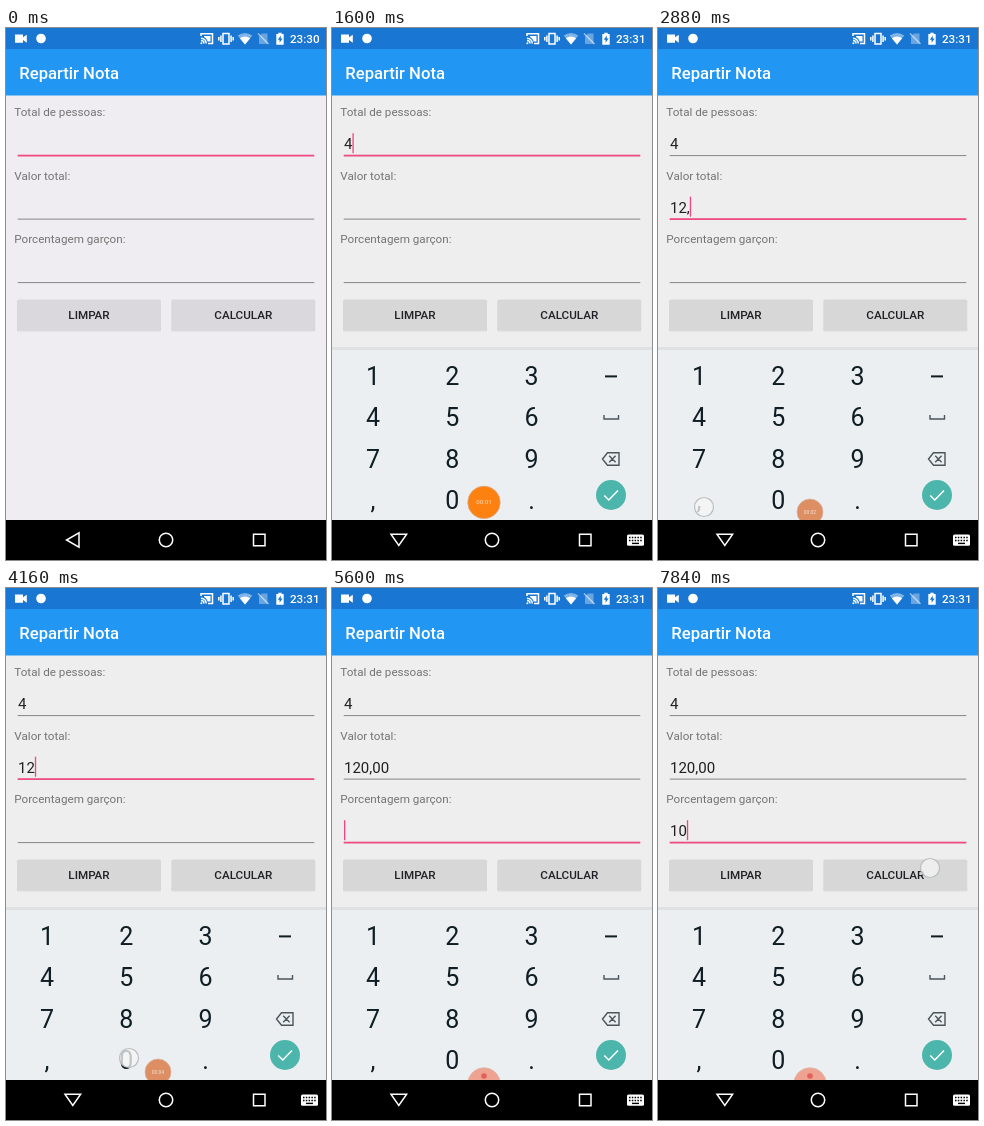
Recreate the animation shown at these times as an HTML page. Size 320 by 532 pixels, loop 8 s.

```html
<!DOCTYPE html>
<html lang="pt">
<head>
<meta charset="utf-8">
<title>Repartir Nota</title>
<style>
  html, body { margin: 0; width: 100%; height: 100%; overflow: hidden; background: #000; }
  svg { display: block; width: 100%; height: 100%; }
  text { font-family: Roboto, Arial, sans-serif; white-space: pre; }
  .label { font-size: 11.67px; fill: #747474; }
  .value { font-size: 15px; fill: #202020; }
  .button { font-size: 11.67px; font-weight: 500; fill: #202124; text-anchor: middle; }
  .key { font-size: 25px; fill: #0f1d24; text-anchor: middle; }
  .line { fill: none; stroke: #fff; stroke-width: 1.5; }
</style>
</head>
<body>
<svg id="stage" viewBox="0 0 320 532">
  <defs>
    <linearGradient id="shade" x2="0" y2="1">
      <stop stop-color="#000" stop-opacity=".22"/>
      <stop offset="1" stop-color="#000" stop-opacity="0"/>
    </linearGradient>
  </defs>
  <rect id="page" width="320" height="532"/>
  <rect width="320" height="21" fill="#1976d2"/>
  <rect y="21" width="320" height="46.5" fill="#2196f3"/>
  <text x="13.3" y="50.5" font-size="16.67" font-weight="500" fill="#fff">Repartir Nota</text>

  <!-- status bar -->
  <g fill="#fff">
    <path d="M9 6.5h8v2.8l3.8-2.6v8l-3.8-2.6v2.7h-8z"/>
    <circle cx="35" cy="10.5" r="4.8"/>
    <path class="line" stroke-width="1.2" d="M195 8V5.8h11.5v9.7H202M195 10.2a5.3 5.3 0 0 1 5.3 5.3M195 12.5a3 3 0 0 1 3 3"/>
    <circle cx="195.4" cy="15.2" r="1"/>
    <path d="M198 8h6.5v5.5h-2.8A7 7 0 0 0 198 9z"/>
    <path class="line" d="M217 5.5h6v10.5h-6zM214.9 7.5v6.5M225.1 7.5v6.5M212.8 9v3.5M227.2 9v3.5"/>
    <path d="M239 16.5L231.7 7.6Q239 2.6 246.3 7.6z" opacity=".45"/>
    <path d="M239 16.5L233.8 10.2Q239 6.6 244.2 10.2z"/>
    <path d="M256 5.5h5.5v10.5h-8.5V8.5z" opacity=".35"/>
    <path class="line" d="M252 5.5l10.5 10.5" stroke-width="1.2" opacity=".55"/>
    <path d="M270.3 6h2v-1.3h3.4V6h2v10.7h-7.4z"/>
    <path d="M274.8 7.5l-3 4.3h1.8v3l3-4.4h-1.8z" fill="#1976d2"/>
    <text id="clock" x="284" y="15.3" font-size="11.67" font-weight="500"></text>
  </g>

  <g id="form"></g>
  <rect id="cursor" width="1.3" height="20" fill="#f0457f"/>

  <g id="keyboard">
    <rect y="320" width="320" height="172" fill="#eceff1"/>
    <rect y="319" width="320" height="3" fill="#dfe1e3"/>
    <g id="keys"></g>
    <rect x="273" y="347.4" width="12" height="2" fill="#0f1d24"/>
    <g fill="none" stroke="#4a565c" stroke-width="1.4">
      <path d="M272 387v4h14.5v-4"/>
      <path d="M275.5 424.7H287v12.6h-11.5l-5-6.3zM277.2 427.8l6.4 6.4M283.6 427.8l-6.4 6.4"/>
    </g>
    <circle cx="279" cy="467" r="15" fill="#4db6ac"/>
    <path class="line" stroke-width="2" d="M272.3 467.5l4.5 4.5 9.2-9.5"/>
  </g>

  <g id="bubble">
    <circle id="disc" cx="152"/>
    <text id="timer" x="152" text-anchor="middle" font-size="6" fill="#fff" opacity=".75"></text>
    <circle id="dot" cx="152" cy="488" r="2.8" fill="#e2605c"/>
  </g>

  <!-- navigation bar -->
  <rect y="492" width="320" height="40"/>
  <path id="back" class="line"/>
  <circle class="line" cx="160" cy="512" r="6.7"/>
  <path class="line" d="M247.5 506.3h11.5v11.5h-11.5z"/>
  <g id="switcher">
    <rect x="295" y="506.5" width="17" height="11.3" rx="1.5" fill="#fff"/>
    <path d="M297 509.5h13M297 512.4h13" stroke="#000" stroke-width="1.5" stroke-dasharray="1.5 1.3"/>
    <path d="M300 515.4h7" stroke="#000" stroke-width="1.4"/>
  </g>

  <circle id="touch" r="9.5" fill="#f5f5f5" fill-opacity=".78" stroke="#b9bec2" stroke-width="1.2"/>
</svg>
<script>
const LOOP = 8000, TICK = 160, BLINK = 480;
const $ = id => document.getElementById(id);
const set = (el, attrs) => { for (const k in attrs) el.setAttribute(k, attrs[k]); };
const show = (el, on) => { el.style.display = on ? '' : 'none'; };
const rowY = i => 127.5 + i * 63.5;

$('form').innerHTML =
  ['Total de pessoas:', 'Valor total:', 'Porcentagem garçon:'].map((name, i) =>
    `<text class="label" x="8.3" y="${rowY(i) - 39.2}">${name}</text>
     <text class="value" x="12" y="${rowY(i) - 6.3}"></text>
     <rect class="rule" x="11.7" width="296.6"/>`).join('') +
  [['LIMPAR', 11], ['CALCULAR', 165.3]].map(([name, x]) =>
    `<rect x="${x}" y="299" width="144" height="5.5" rx="2" fill="url(#shade)"/>
     <rect class="face" x="${x}" y="271.5" width="144" height="30.5" rx="2"/>
     <text class="button" x="${x + 72}" y="291">${name}</text>`).join('');

$('keys').innerHTML = [...'123456789,0.'].map((c, i) =>
  `<text class="key" x="${41 + i % 3 * 79.3}" y="${357 + Math.floor(i / 3) * 41.3}">${c}</text>`).join('');

const values = [...document.querySelectorAll('.value')];
const rules = [...document.querySelectorAll('.rule')];
const faces = [...document.querySelectorAll('.face')];

// time, field, content
const edits = [
  [160, 0, ''], [1440, 0, '4'], [2080, 1, ''], [2400, 1, '1'], [2560, 1, '12'],
  [2880, 1, '12,'], [3840, 1, '12'], [4320, 1, '120'], [4640, 1, '120,'],
  [4960, 1, '120,0'], [5120, 1, '120,00'], [5440, 2, ''], [6560, 2, '1'],
  [7040, 2, '10'], [7840, 2, '10']
];

// first and last tick, x, y
const touches = [
  [1280, 1440, 46, 396], [1920, 1920, 120, 178], [2400, 2400, 46, 354],
  [2560, 2560, 125, 354], [2720, 2880, 46, 479], [3680, 3840, 283, 434],
  [4160, 4160, 123, 470], [4480, 4640, 46, 479], [4800, 4800, 123, 470],
  [5120, 5120, 123, 470], [5280, 5280, 110, 240], [6400, 6560, 46, 354],
  [6880, 6880, 123, 470], [7840, 7840, 272, 280]
];

// time, y, radius, red, green, blue
const bubblePath = [
  [480, 473, 17, 255, 122, 0], [1440, 473, 17, 255, 122, 0],
  [2240, 480, 13.5, 243, 157, 82], [2720, 484, 13, 221, 142, 98],
  [4960, 484, 13, 221, 142, 98], [5280, 496, 16.3, 238, 163, 146]
];

function sample(path, t) {
  const next = path.findIndex(p => p[0] > t);
  if (next < 0) return path[path.length - 1];
  if (!next) return path[0];
  const a = path[next - 1], b = path[next];
  const k = (t - a[0]) / (b[0] - a[0]);
  return a.map((v, i) => v + (b[i] - v) * k);
}

function drawForm(t, open) {
  const text = ['', '', ''];
  let focus = 0, since = 0;
  for (const [at, field, content] of edits) {
    if (at > t) break;
    text[field] = content;
    focus = field;
    since = at;
  }
  values.forEach((el, i) => { el.textContent = text[i]; });
  rules.forEach((el, i) => {
    const on = i === focus;
    set(el, { y: rowY(i) - (on ? .8 : .4), height: on ? 1.8 : 1, fill: on ? '#ee4d82' : '#858585' });
  });
  const width = text[focus] ? values[focus].getComputedTextLength() : 0;
  set($('cursor'), { x: 12 + width, y: rowY(focus) - 22.3 });
  show($('cursor'), open && (t - since) % (2 * BLINK) < BLINK);
  faces.forEach(el => set(el, { fill: open ? '#d7d7d7' : '#dad7dd' }));
}

function drawBubble(t) {
  const [, y, r, ...rgb] = sample(bubblePath, t);
  const sunk = y > 490;
  show($('bubble'), t >= 480);
  set($('disc'), {
    cy: y, r, fill: `rgb(${rgb.map(Math.round)})`,
    stroke: r > 16.5 ? '#d29bc0' : '#d8b5a4', 'stroke-width': r > 16.5 ? 1.5 : .7
  });
  $('timer').textContent = '00:0' + Math.floor(t / 1000);
  set($('timer'), { y: y + 2, 'font-size': r * .38 });
  show($('timer'), !sunk);
  show($('dot'), sunk);
}

function draw(now) {
  const t = Math.floor(now % LOOP / TICK) * TICK;
  const open = t >= 160;
  set($('page'), { fill: open ? '#eeeeee' : '#efedf2' });
  $('clock').textContent = open ? '23:31' : '23:30';
  show($('keyboard'), open);
  show($('switcher'), open);
  set($('back'), { d: open ? 'M59 506.3h15.6l-7.8 11.2z' : 'M73 504.8v14.4l-12.5-7.2z' });
  drawForm(t, open);
  drawBubble(t);
  const touch = touches.find(([from, to]) => t >= from && t <= to);
  show($('touch'), touch);
  if (touch) set($('touch'), { cx: touch[2], cy: touch[3] });
}

const start = performance.now();
function frame() {
  draw(performance.now() - start);
  requestAnimationFrame(frame);
}
frame();
</script>
</body>
</html>
```
